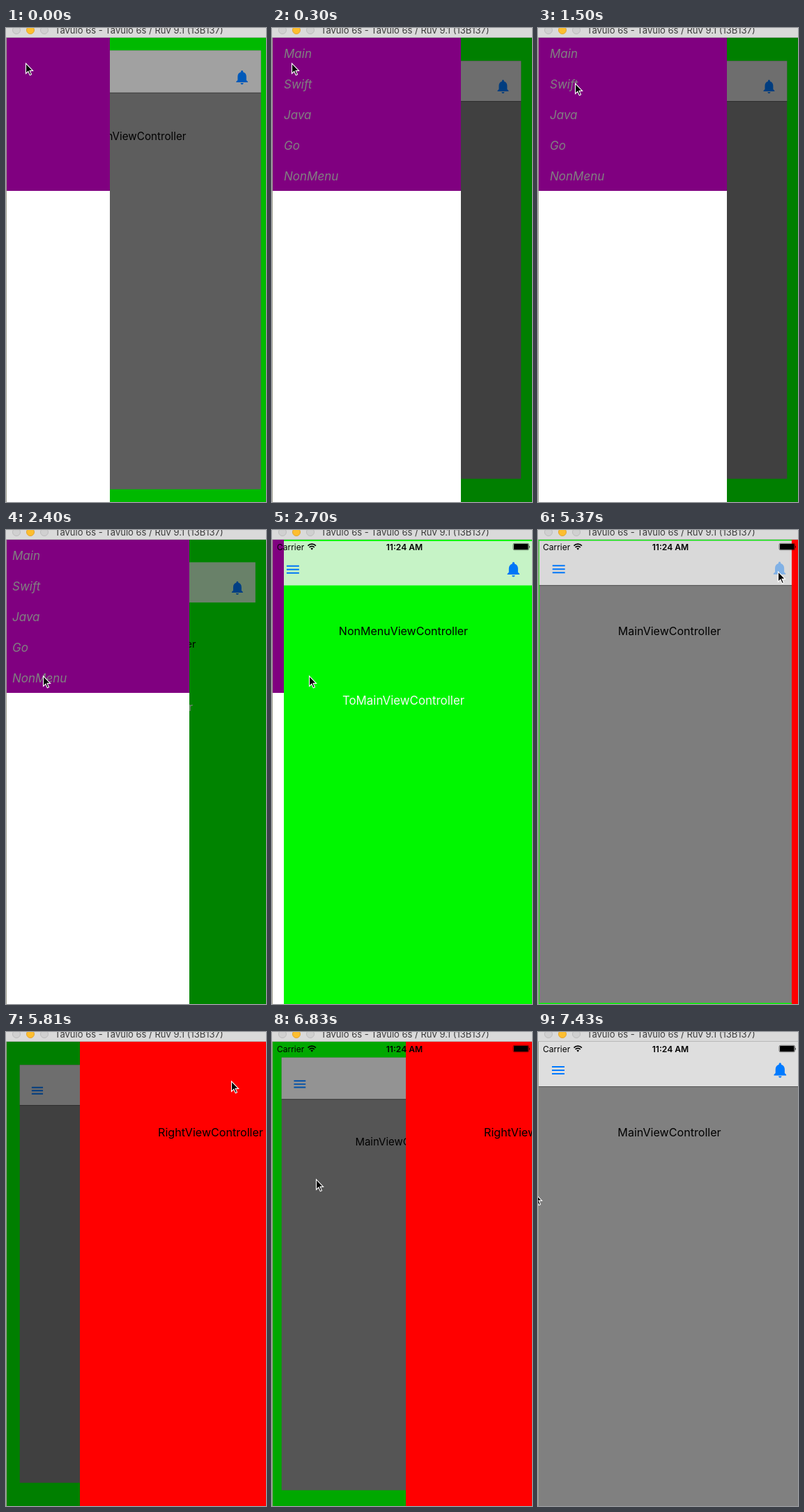
These frames come from a looping animation (373x681 px, 8000 ms). An HTML page:

```html
<!DOCTYPE html>
<html lang="en">
<head>
<meta charset="utf-8">
<title>Slide menu</title>
<style>
  html, body { margin: 0; width: 100%; height: 100%; overflow: hidden; }
  svg { display: block; width: 373px; height: 681px; font: 16.1px Inter, Roboto, sans-serif; }
  .centered { text-anchor: middle; }
</style>
</head>
<body>
<svg viewBox="0 0 373 681">
  <defs>
    <path id="menuIcon" fill="#007aff" d="M20 49h18v2H20zM20 54h18v2H20zM20 59h18v2H20z"/>
    <path id="bellIcon" fill="#007aff" transform="translate(334.1 41.5) scale(1.1)"
      d="M12 22c1.1 0 2-.9 2-2h-4c0 1.1.9 2 2 2zm6-6v-5c0-3.07-1.64-5.64-4.5-6.32V4c0-.83-.67-1.5-1.5-1.5s-1.5.67-1.5 1.5v.68C7.63 5.36 6 7.92 6 11v5l-2 2v1h16v-1l-2-2z"/>
  </defs>

  <rect width="373" height="681" fill="#0f0"/>

  <g id="content">
    <g id="mainScreen">
      <rect x="1" y="14" width="375" height="667" fill="#808080"/>
      <rect x="1" y="14" width="375" height="64" fill="#dedede"/>
      <rect x="1" y="78" width="375" height="1" fill="#555"/>
      <text class="centered" x="188.5" y="150">MainViewController</text>
    </g>
    <g id="otherScreen">
      <rect x="1" y="14" width="375" height="667" fill="#0f0"/>
      <rect x="1" y="14" width="375" height="64" fill="#ccfbcc"/>
      <text class="centered" x="188.5" y="150">NonMenuViewController</text>
      <text id="toMain" class="centered" x="188.5" y="250.5" font-size="17" fill="#fff">ToMainViewController</text>
    </g>
    <use href="#menuIcon"/>
    <use id="bell" href="#bellIcon"/>
  </g>

  <rect id="shade" width="373" height="681"/>

  <g id="leftPanel">
    <rect x="1" y="14" width="270" height="667" fill="#fff"/>
    <rect x="1" y="14" width="270" height="220" fill="#800080"/>
    <g font-size="17" font-style="italic" fill="#808080">
      <text x="17" y="43">Main</text>
      <text x="17" y="87">Swift</text>
      <text x="17" y="131">Java</text>
      <text x="17" y="175">Go</text>
      <text x="17" y="219">NonMenu</text>
    </g>
  </g>

  <g id="rightPanel">
    <rect x="376" y="14" width="270" height="667" fill="#f00"/>
    <text class="centered" x="563.5" y="150">RightViewController</text>
  </g>

  <g id="statusBar" font-size="12">
    <text x="7" y="28.5">Carrier</text>
    <path fill="none" stroke="#000" stroke-width="1.7"
      d="M51.5 22.6a8 8 0 0 1 11.4 0M53.6 25a5 5 0 0 1 7.2 0"/>
    <path d="M55.4 26.6a2.6 2.6 0 0 1 3.6 0L57.2 28.7z"/>
    <text class="centered" x="190" y="28.5" font-size="12.1" font-weight="600">11:24 AM</text>
    <rect x="346" y="19.25" width="22.5" height="9.5" rx="2" fill="none" stroke="#000" stroke-width=".5"/>
    <rect x="347" y="20" width="20.5" height="8" rx="1"/>
    <path d="M369 22.5q1.8 1.7 0 3.4z"/>
  </g>

  <rect width="373" height="14" fill="#dadada"/>
  <rect y="13" width="373" height="1" fill="#b8b8b8"/>
  <g stroke-width="1">
    <circle cx="15" cy="3" r="5.5" fill="#d0d0d0" stroke="#bcbcbc"/>
    <circle cx="35" cy="3" r="5.5" fill="#fdbe2f" stroke="#e2a530"/>
    <circle cx="55" cy="3" r="5.5" fill="#d0d0d0" stroke="#bcbcbc"/>
  </g>
  <text x="70" y="8" font-size="13" fill="#3c3c3c">Tavulo 6s - Tavulo 6s / Ruv 9.1 (13B137)</text>
  <rect y="14" width="1" height="667" fill="#a0a090"/>

  <path id="cursor" stroke="#fff" stroke-width="1.1"
    d="M.5 .8V15.4L3.8 12.3 6.3 17.8 8.5 16.8 6.1 11.4H10.6Z"/>
</svg>
<script>
const LOOP = 8000, SLIDE = 400, PANEL = 270;
const el = id => document.getElementById(id);
const set = (id, name, value) => el(id).setAttribute(name, value);
const show = (id, visible) => set(id, 'visibility', visible ? 'visible' : 'hidden');

const shortTicks = [22, 24, 32, 36, 39, 42, 44];
const tickStart = n => 150 * n - 10 * shortTicks.filter(s => s < n).length;

function tickAt(time) {
  let n = 53;
  while (n > 0 && tickStart(n) > time) n--;
  return n;
}

const smooth = u => {
  u = Math.min(1, Math.max(0, u));
  return u * u * (3 - 2 * u);
};
const slide = (time, start) => smooth((time - start) / SLIDE);

// Pointer stops: tick, x, y
const stops = [
  [5, 28, 50], [10, 53, 79], [12, 53, 199], [14, 53, 209], [19, 53, 209],
  [23, 174, 245], [28, 174, 245], [34, 344, 59], [38, 344, 59],
  [44, 63, 211], [47, 63, 211], [50, -5, 231]
];

function pointerAt(tick) {
  const next = stops.findIndex(s => s[0] >= tick);
  if (next === 0) return stops[0].slice(1);
  if (next < 0) return stops[stops.length - 1].slice(1);
  const [t0, x0, y0] = stops[next - 1], [t1, x1, y1] = stops[next];
  const u = smooth((tick - t0) / (t1 - t0));
  return [Math.round(x0 + (x1 - x0) * u), Math.round(y0 + (y1 - y0) * u)];
}

function draw(time) {
  const tick = tickAt(time), t = tickStart(tick);
  const left = slide(t, -213) - slide(t, 2359);
  const right = slide(t, 5319) - slide(t, 6679);
  const open = Math.max(left, right);
  const onOther = t >= 2400 && t < 3730;

  set('content', 'transform',
    `translate(188.5 347.5) scale(${1 - 0.1 * open}) translate(-188.5 -347.5)`);
  set('shade', 'opacity', 0.5 * open);
  set('leftPanel', 'transform', `translate(${Math.round(PANEL * (left - 1))} 0)`);
  set('rightPanel', 'transform', `translate(${Math.round(-PANEL * right)} 0)`);
  show('leftPanel', left > 0);
  show('mainScreen', !onOther);
  show('otherScreen', onOther);
  show('statusBar', !(t < 2500 || t >= 5500 && t < 6800));
  set('toMain', 'opacity', tick === 24 ? 0.3 : 1);
  set('bell', 'opacity', tick === 35 ? 0.25 : tick === 36 ? 0.4 : 1);
  set('cursor', 'transform', `translate(${pointerAt(tick)})`);
}

const start = performance.now();
function loop() {
  draw((performance.now() - start) % LOOP);
  requestAnimationFrame(loop);
}
loop();
</script>
</body>
</html>
```
